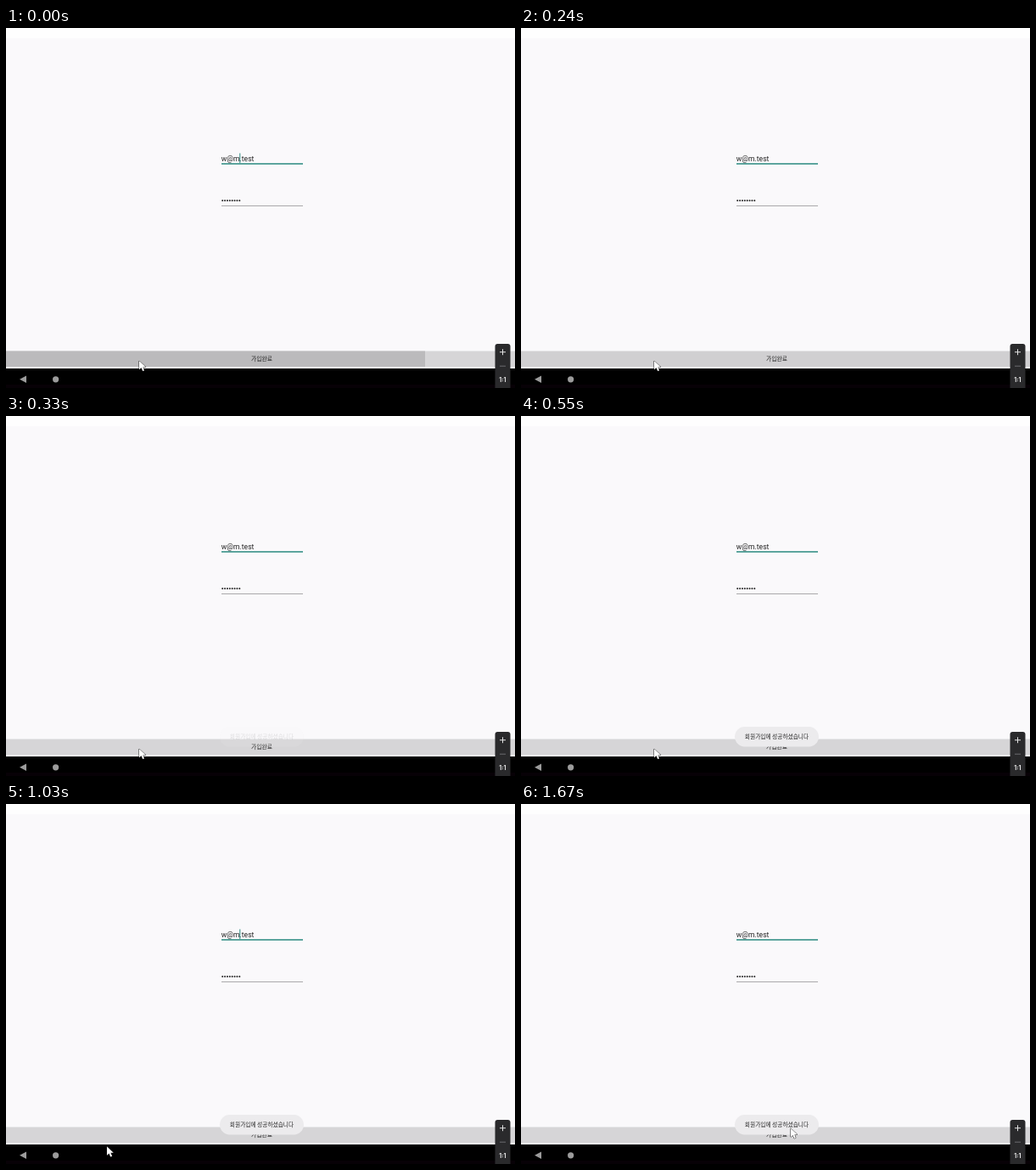
These frames come from a looping animation (600 px wide and 424 px high, 1700 ms). An HTML page with a canvas:

```html
<!DOCTYPE html>
<html lang="ko">
<head>
<meta charset="utf-8">
<title>가입</title>
<style>
  html, body { margin: 0; width: 100%; height: 100%; overflow: hidden; background: #000; }
  canvas { display: block; }
</style>
</head>
<body>
<canvas id="stage" width="600" height="424"></canvas>
<script>
const ctx = document.getElementById('stage').getContext('2d');
const LOOP = 1700, STEP = 30;
const HANGUL = '"Noto Sans CJK KR", "Noto Sans CJK", sans-serif';

// Pointer path: time, x, y
const PATH = [
  [0, 157, 392], [730, 157, 392], [760, 153.5, 392], [890, 139, 396],
  [1030, 117.5, 404], [1110, 117.5, 404], [1200, 166, 384], [1300, 231, 361],
  [1410, 267, 354], [1530, 298, 367], [1650, 318, 382]
];

const clamp = v => Math.max(0, Math.min(1, v));
const mix = (a, b, k) => a + (b - a) * k;

function rect(x, y, w, h, color) {
  ctx.fillStyle = color;
  ctx.fillRect(x, y, w, h);
}

function pill(x, y, w, h, r, color) {
  ctx.fillStyle = color;
  ctx.beginPath();
  ctx.roundRect(x, y, w, h, r);
  ctx.fill();
}

function dot(x, y, r, color) {
  ctx.fillStyle = color;
  ctx.beginPath();
  ctx.arc(x, y, r, 0, Math.PI * 2);
  ctx.fill();
}

function label(text, x, y, font, color, align = 'center') {
  ctx.font = font;
  ctx.fillStyle = color;
  ctx.textAlign = align;
  ctx.fillText(text, x, y);
}

function polygon(points) {
  ctx.beginPath();
  points.forEach(([x, y]) => ctx.lineTo(x, y));
  ctx.closePath();
}

function pointerAt(t) {
  const i = PATH.findIndex(p => p[0] > t);
  if (i < 0) return PATH[PATH.length - 1].slice(1);
  const a = PATH[i - 1], b = PATH[i];
  const k = (t - a[0]) / (b[0] - a[0]);
  return [mix(a[1], b[1], k), mix(a[2], b[2], k)];
}

function drawForm(caretOn) {
  rect(0, 0, 600, 424, '#faf9fb');
  rect(0, 0, 600, 12, '#fefefe');
  label('w@m.test', 253.8, 156.8, '8.6px Roboto, sans-serif', '#252525', 'left');
  if (caretOn) rect(275.3, 147.5, 1, 11.5, '#2b8a80');
  rect(254, 159.2, 96, 1.5, '#2b8a80');
  for (let i = 0; i < 8; i++) dot(255.2 + i * 2.87, 203.3, 1, '#202020');
  rect(254, 209, 96, 1, '#aaa9ab');
}

function drawButton(t) {
  rect(0, 380.5, 600, 18.5, t >= 240 && t < 300 ? '#d0cfd1' : '#d6d5d7');
  if (t < 240) {
    const edge = mix(494, 600, clamp(t / 90));
    rect(0, 380.5, edge, 18.5, '#bbbabc');
  }
  label('가입완료', 301.5, 391.7, '6.8px ' + HANGUL, '#222');
}

function drawNav() {
  rect(0, 401, 600, 23, '#000');
  ctx.fillStyle = '#9c9c9c';
  polygon([[16, 413.8], [24, 409.5], [24, 418]]);
  ctx.fill();
  dot(58.6, 413.8, 3.6, '#9c9c9c');
}

function drawToast(t) {
  ctx.globalAlpha = clamp((t - 300) / 240);
  pill(252, 366, 99, 23.5, 11.7, '#ecebed');
  label('회원가입에 성공하셨습니다', 301.5, 380.1, '6.7px ' + HANGUL, '#262626');
  ctx.globalAlpha = 1;
}

function drawZoomPanel() {
  pill(576.5, 372, 18, 56, 3, '#2a2a2c');
  rect(582, 381.2, 7, 1, '#e2e2e2');
  rect(585, 378.2, 1, 7, '#e2e2e2');
  rect(582, 397.7, 7, 1, '#6c6c6e');
  label('1:1', 585.4, 417, 'bold 7px Inter, sans-serif', '#e8e8e8');
}

function drawPointer([x, y]) {
  ctx.save();
  ctx.translate(x, y);
  polygon([[0, 0], [0, 10.2], [2.4, 8.1], [4.2, 12], [6, 11.2], [4.3, 7.4], [7.6, 7.2]]);
  ctx.lineJoin = 'round';
  ctx.lineWidth = 1;
  ctx.strokeStyle = '#222';
  ctx.stroke();
  ctx.fillStyle = '#fff';
  ctx.fill();
  ctx.restore();
}

function render(t) {
  if (t >= 300 && t < 330) {
    rect(0, 0, 600, 424, '#000');
  } else {
    drawForm(t < 240 || (t >= 750 && t < 1260));
    drawButton(t);
    drawNav();
    if (t >= 330) drawToast(t);
  }
  rect(0, 420, 600, 4, '#070106');
  drawZoomPanel();
  drawPointer(pointerAt(t));
}

const start = performance.now();
function tick() {
  const t = (performance.now() - start) % LOOP;
  render(Math.floor(t / STEP) * STEP);
  requestAnimationFrame(tick);
}
tick();
</script>
</body>
</html>
```
